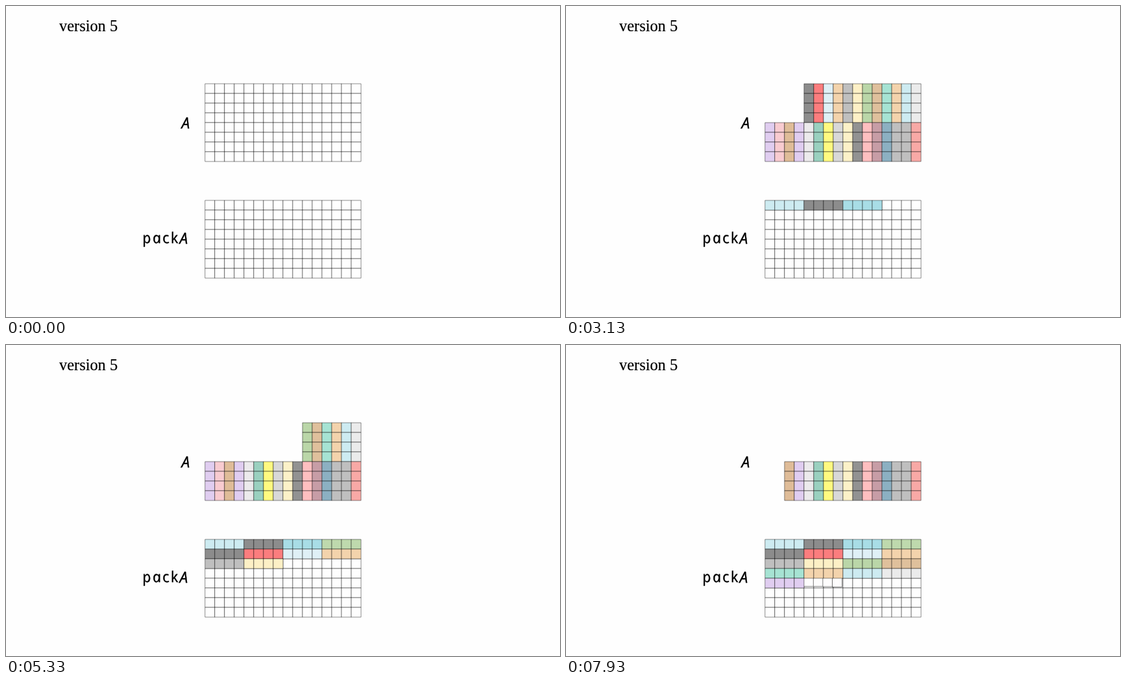
Write an HTML page with a canvas that moves like this. It is 854x480 px and loops after 8000 ms.

```html
<!DOCTYPE html>
<html lang="en">
<head>
<meta charset="utf-8">
<title>Matrix packing</title>
<style>
  html, body { margin: 0; width: 100%; height: 100%; overflow: hidden; background: #fefefe; }
  canvas { display: block; }
</style>
</head>
<body>
<canvas id="stage" width="854" height="480"></canvas>
<script>
const ctx = document.getElementById('stage').getContext('2d');
const LOOP = 8000, FPS = 15;
const COLS = 16, ROWS = 8, BAND = 4;
const CW = 15.0125, CH = 15, LEFT = 427 - 8 * CW;
const A_TOP = 120, PACK_TOP = 300;
const PAINT_AT = 1, MOVE_AT = 2, STEP = 1 / 3, RUN = 0.3;
const PAPER = [254, 254, 254];

// one colour per four-cell strip, upper band then lower band
const strips = (
  'cdebf1 8c8c8c a8dde6 bed9ad 8c8c8c fb7d7e dff0f6 f3d3ac ' +
  'bfbfbf fdf0c6 bad6a8 dfc09c a6e3d3 f3d3ac cdebf1 ebebeb ' +
  'e0cdf0 f8cbd0 dfbc98 e0cdf0 eceaec 9ad0bf fffa80 d8d8d8 ' +
  'fcf1c8 929292 febfc0 c79da6 8cb0c2 bfbfbf bfbfbf f8a9a6'
).split(' ').map(h => [0, 2, 4].map(i => parseInt(h.slice(i, i + 2), 16)));

const mix = (a, b, p) => a + (b - a) * p;
const sigmoid = x => 1 / (1 + Math.exp(-x));

function smooth(x) {
  const edge = sigmoid(-5);
  return Math.min(1, Math.max(0, (sigmoid(10 * (x - 0.5)) - edge) / (1 - 2 * edge)));
}

function cell(x, y, rgb) {
  ctx.fillStyle = `rgb(${rgb.map(Math.round).join(',')})`;
  ctx.fillRect(x, y, CW, CH);
  ctx.strokeRect(x, y, CW, CH);
}

const colX = c => LEFT + c * CW;
const stripOf = (row, col) => Math.floor(row / BAND) * COLS + col;

function packPos(k, j) {
  const n = k * BAND + j;
  return [colX(n % COLS), PACK_TOP + Math.floor(n / COLS) * CH];
}

function sourcePos(k, j) {
  return [colX(k % COLS), A_TOP + (Math.floor(k / COLS) * BAND + j) * CH];
}

function drawPack(from, to, filled) {
  for (let k = from; k < to; k++)
    for (let j = 0; j < BAND; j++)
      cell(...packPos(k, j), filled ? strips[k] : PAPER);
}

function drawMoving(k, p) {
  const rgb = strips[k].map((v, i) => mix(v, PAPER[i], p));
  for (let j = 0; j < BAND; j++) {
    const [x0, y0] = sourcePos(k, j), [x1, y1] = packPos(k, j);
    cell(mix(x0, x1, p), mix(y0, y1, p), rgb);
  }
}

function drawMatrix(gone, painted) {
  for (let r = 0; r < ROWS; r++)
    for (let c = 0; c < COLS; c++) {
      const k = stripOf(r, c);
      if (k >= gone) cell(colX(c), A_TOP + r * CH, painted ? strips[k] : PAPER);
    }
}

function label(text, x, y, font, weight, slant = 0, spacing = 0) {
  ctx.save();
  ctx.transform(1, 0, slant, 1, x, y);
  ctx.font = font;
  ctx.letterSpacing = spacing + 'px';
  ctx.lineWidth = weight;
  ctx.lineJoin = 'round';
  ctx.fillStyle = '#000';
  ctx.fillText(text, 0, 0);
  ctx.strokeText(text, 0, 0);
  ctx.restore();
}

function drawLabels() {
  const hand = 'italic 23px "Open Sans", "Noto Sans", sans-serif';
  label('version 5', 82, 38.5, '24.4px "Liberation Serif", "Times New Roman", serif', 0.2);
  label('A', 270.5, 188.5, hand, 0.4);
  label('pack', 211.5, 366, hand, 0.4, 0.21, 2.4); // slant undone for upright round letters
  label('A', 267.5, 366.5, hand, 0.4);
}

function draw(ms) {
  const t = Math.floor(ms * FPS / 1000 + 0.1) / FPS;
  const since = t - MOVE_AT;
  const moving = since >= -1e-6;
  const done = moving ? Math.floor(since / STEP + 1e-6) : 0;
  const p = moving ? smooth((since - done * STEP) / RUN) : 0;
  const inFlight = p > 1e-4 && done < strips.length;

  ctx.fillStyle = '#fefefe';
  ctx.fillRect(0, 0, 854, 480);
  ctx.strokeStyle = '#000';
  ctx.lineWidth = 0.45;

  drawPack(done, strips.length, false);
  if (inFlight) drawMoving(done, p);
  drawPack(0, done, true);
  drawMatrix(done + (inFlight ? 1 : 0), t >= PAINT_AT - 1e-6);
  drawLabels();
}

const start = performance.now();
function tick() {
  draw((performance.now() - start) % LOOP);
  requestAnimationFrame(tick);
}
tick();
</script>
</body>
</html>
```
